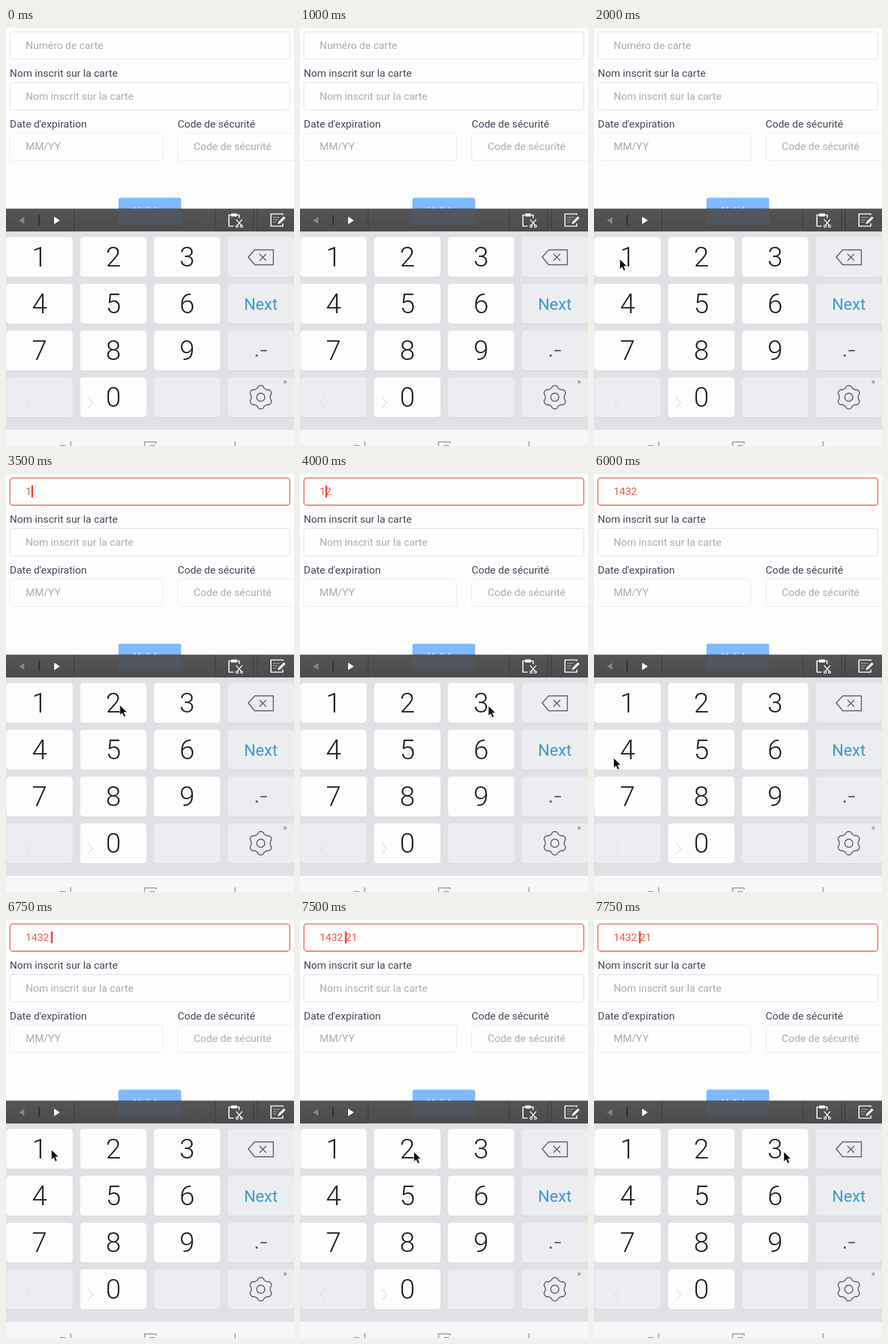
An HTML page for the animation above (8000 ms loop, 425 by 617 pixels).

```html
<!DOCTYPE html>
<html lang="fr">
<head>
<meta charset="utf-8">
<title>Saisie de carte</title>
<style>
html, body { margin: 0; width: 100%; height: 100%; overflow: hidden; background: #fdfdfd; }
svg { display: block; width: 425px; height: 617px; font-family: Roboto, sans-serif; }
.form text { font-size: 15.35px; }
.label { fill: #3f4757; }
.hint { fill: #aaabad; }
.field { fill: #fefefe; stroke: #dddfe3; }
.faint { stroke: #ededf0; }
.digit { font-size: 40.5px; font-weight: 300; fill: #222; text-anchor: middle; }
.line { fill: none; stroke: #55575b; stroke-width: 1.4; stroke-linejoin: round; }
.icon { fill: none; stroke: #f4f4f4; stroke-width: 1.7; stroke-linejoin: round; }
</style>
</head>
<body>
<svg viewBox="0 0 425 617">
  <defs>
    <linearGradient id="bar" x2="0" y2="1">
      <stop offset="0" stop-color="#555"/><stop offset="1" stop-color="#4b4b4b"/>
    </linearGradient>
  </defs>
  <rect width="425" height="617" fill="#fdfdfd"/>

  <g class="form">
    <rect id="card" class="field" x="5.8" y="5.8" width="413" height="40.2" rx="4"/>
    <rect class="field" x="5.8" y="80.5" width="413" height="40.5" rx="4"/>
    <rect class="field faint" x="5.5" y="155.5" width="225.5" height="40" rx="4"/>
    <rect class="field faint" x="253.5" y="155.5" width="190" height="40" rx="4"/>
    <text class="label" x="5.6" y="72">Nom inscrit sur la carte</text>
    <text class="label" x="5.6" y="147">Date d'expiration</text>
    <text class="label" x="253.2" y="147">Code de sécurité</text>
    <text class="hint" id="hint" x="29" y="30.8">Numéro de carte</text>
    <text class="hint" x="29" y="105.5">Nom inscrit sur la carte</text>
    <text class="hint" x="29" y="180.2">MM/YY</text>
    <text class="hint" x="277" y="180.2">Code de sécurité</text>
    <text id="value" x="29" y="30.8" fill="#f05545" xml:space="preserve"></text>
    <rect id="caret" y="17" width="2.5" height="17.5"/>
    <rect x="166" y="250.5" width="92.5" height="40" rx="3" fill="#7ebaff"/>
    <text x="212" y="275" fill="#fff" text-anchor="middle">Valider</text>
  </g>

  <rect y="266.6" width="425" height="34" fill="url(#bar)"/>
  <rect x="166" y="266.6" width="92.5" height="24" fill="#505a68" opacity=".6"/>
  <g fill="none" stroke="#3c3c3c">
    <path d="M100.5 267v33M308.5 267v33M365.5 267v33M370.5 267v33"/>
    <path d="M0 299.5h100M308 299.5h57M371 299.5h54"/>
    <path d="M48.8 276v15" stroke="#222" stroke-width="1.5"/>
  </g>
  <path d="M27 279v10l-8-5z" fill="#858585"/>
  <path d="M71 278.5v11l8.500-5.500z" fill="#fff"/>
  <g class="icon">
    <path d="M336 292.500h-7v-16.500h15v4.500M333 277.500v-3h7v3z"/>
    <path d="M339.500 282.500l8 9M348.500 282.500l-7 8.500" stroke-width="1.4"/>
    <circle cx="341" cy="292.500" r="1.700" stroke-width="1.300"/>
    <circle cx="347.500" cy="292.500" r="1.700" stroke-width="1.300"/>
    <path d="M408.500 276v-1.500h-17.500v18h17.500v-4"/>
    <path d="M394 279.500h10M394 283h7M394 286.500h5" stroke="#aaa" stroke-width="1"/>
    <path d="M401.500 289l1-3 7.500-7.500 2 2-7.500 7.500z" fill="#f4f4f4" stroke-width="1"/>
  </g>

  <rect y="300.5" width="425" height="293" fill="#dfe1e5"/>
  <g id="keys"></g>
  <path d="M37 545l-7 8 7 8M121 545l7 8-7 8" fill="none" stroke="#e2e3e8" stroke-width="1.500"/>
  <path class="line" d="M357.500 338l9.500-10.500h27.500v22h-27.500zM374 333.500l10 10M384 333.500l-10 10"/>
  <text x="376" y="415.500" font-size="24" fill="#3c9ac4" text-anchor="middle">Next</text>
  <path d="M368.500 482h3v3h-3zM375.500 475.300h9.500v2h-9.500z" fill="#55575b"/>
  <path id="gear" class="line"/>
  <circle class="line" cx="376" cy="545" r="6"/>
  <circle cx="412" cy="522.500" r="2.400" fill="#a9abb0"/>

  <rect y="593" width="425" height="24" fill="#f7f7f9"/>
  <path d="M79 616.500h9M95.500 610v7M204.500 617v-6h17v2.500M212 616.500h8M338 610v7"
    fill="none" stroke="#98999c" stroke-width="1.500"/>

  <path id="pointer" d="M0 0v15l3.400-3.100 2.400 5.500 2.700-1.100-2.400-5.500h4.700z"
    fill="#0a0a0a" stroke="#fff" stroke-width=".8" visibility="hidden"/>
</svg>
<script>
const LOOP = 8000;
const START = 29;
const $ = id => document.getElementById(id);
const hint = $('hint'), card = $('card'), value = $('value');
const caret = $('caret'), pointer = $('pointer');

// [time, text, caret offset in px]
const typed = [
  [0, '', 0], [2750, '1', 8.5], [3750, '12', 8.5], [4250, '132', 8.5],
  [5000, '1432', 37.3], [7000, '1432 1', 37.3], [7500, '1432 21', 37.3]
];
// [time, x, y]
const moves = [
  [1750, 38, 341], [3250, 110, 345], [3500, 168, 341], [4000, 278, 342],
  [4500, 120, 390], [4750, 29, 419], [6500, 50, 375], [6750, 67, 339],
  [7250, 168, 342], [7750, 280, 342]
];
// times at which the caret turns on and off in turn
const blinks = [500, 1000, 1500, 2000, 2500, 5500, 6250, LOOP];

const at = (steps, t) => steps.filter(s => s[0] <= t).pop();

function buildKeys() {
  const labels = '123 456 789  0  ';
  let html = '';
  for (let i = 0; i < 16; i++) {
    const col = i % 4, row = i >> 2;
    const x = 0.5 + col * 108.9, y = 308.5 + row * 69.1;
    const label = labels[i].trim();
    const box = `x="${x}" width="98" height="59" rx="5"`;
    html += `<rect ${box} y="${y + 1}" fill="#d2d4d9"/>` +
      `<rect ${box} y="${y}" fill="${label ? '#fdfdfd' : '#ebedf1'}"/>`;
    if (label) html += `<text class="digit" x="${x + 49}" y="${y + 43.4}">${label}</text>`;
  }
  $('keys').innerHTML = html;
}

function buildGear() {
  const points = [];
  for (let i = 0; i < 144; i++) {
    const a = i / 144 * 2 * Math.PI;
    const r = 15.6 + 1.8 * Math.tanh(1.5 * Math.cos(6 * a));
    points.push((376 + r * Math.sin(a)).toFixed(2) + ' ' + (545 - r * Math.cos(a)).toFixed(2));
  }
  $('gear').setAttribute('d', 'M' + points.join('L') + 'Z');
}

function show(el, on) {
  el.setAttribute('visibility', on ? 'visible' : 'hidden');
}

function draw(now) {
  const t = now % LOOP;
  const [, text, offset] = at(typed, t);
  value.textContent = text;
  show(hint, !text);
  card.style.stroke = text ? '#ee5b4d' : '';
  card.style.strokeWidth = text ? 1.3 : '';
  caret.setAttribute('x', START + offset);
  caret.setAttribute('fill', text ? '#ec4030' : '#4a5160');
  show(caret, blinks.filter(b => b <= t).length % 2);
  const move = at(moves, t);
  show(pointer, move);
  if (move) pointer.setAttribute('transform', `translate(${move[1]} ${move[2]})`);
}

buildKeys();
buildGear();
const begin = performance.now();
function tick() {
  draw(performance.now() - begin);
  requestAnimationFrame(tick);
}
tick();
</script>
</body>
</html>
```
